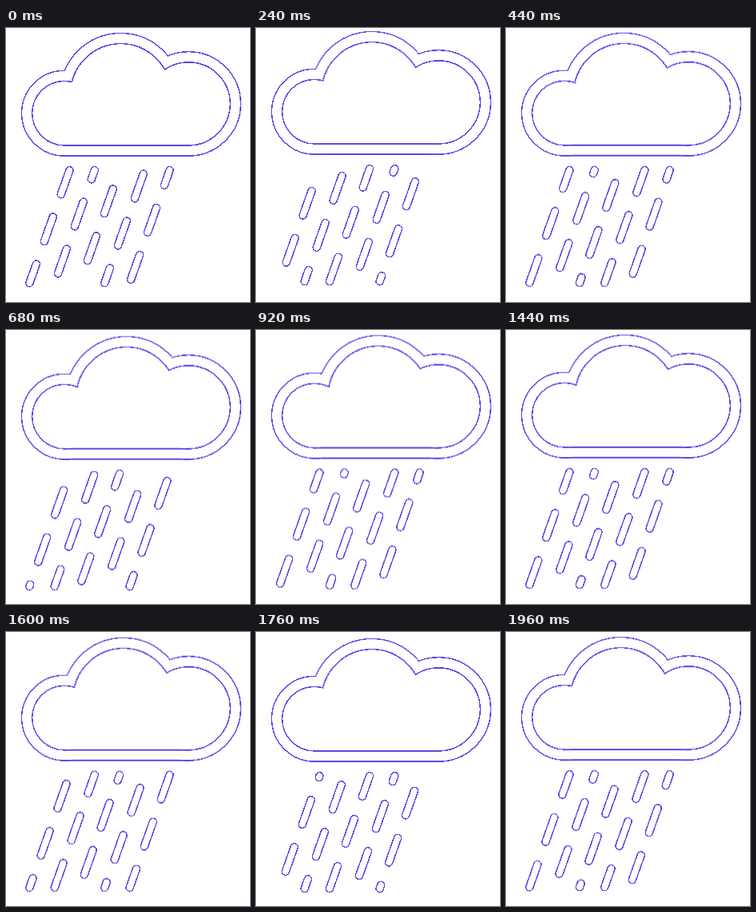
An HTML page for the animation above (2 s loop, 305 by 343 pixels).

```html
<!DOCTYPE html>
<html lang="en">
<head>
<meta charset="utf-8">
<title>Rain cloud</title>
<style>
  html, body { margin: 0; width: 100%; height: 100%; overflow: hidden; background: #fff; }
  svg { display: block; width: 305px; height: 343px; shape-rendering: crispEdges; }
  .ink { fill: #5b45e4; stroke: #5b45e4; }
  .paper { fill: #fff; stroke: #fff; }
  .cloud { stroke-linejoin: round; }
  .drops { stroke-linecap: round; stroke-dasharray: 30.6 28.4; }

  .scene { animation: bob 1s infinite cubic-bezier(.333, 0, .667, 1); }
  .puff { animation: sway 2s infinite cubic-bezier(.333, 0, .667, 1); }
  .drops path { animation: fall .5s linear infinite; }

  @keyframes bob {
    0%, 50%, 100% { transform: translateY(0); }
    25% { transform: translateY(-2px); }
    75% { transform: translateY(2px); }
  }
  @keyframes sway {
    0%, 100% { transform: translateX(0); }
    50% { transform: translateX(9.5px); }
  }
  @keyframes fall {
    from { stroke-dashoffset: var(--from); }
    to { stroke-dashoffset: calc(var(--from) - 59px); }
  }
</style>
</head>
<body>
<svg viewBox="0 0 305 343">
  <g class="scene" id="scene"></g>
</svg>
<script>
  const scene = document.getElementById('scene');

  const cloud = `
    <circle cx="73" cy="106.7" r="39.6"/>
    <circle cx="228.2" cy="94.9" r="51.4"/>
    <circle class="puff" cx="143.4" cy="82.3" r="62"/>
    <rect x="73" y="100" width="155.2" height="46.3"/>`;

  // Distance of the first dash from the top of each stream, in vertical units.
  const starts = [-0.7, -19.6, 23.2, 4.4, -12.2];
  const streams = starts.map((start, i) =>
    `<path pathLength="141" style="--from:${-start}px" d="M${79.4 + 31.3 * i} 178.2l-50 141"/>`
  ).join('');

  // Alternating ink and paper layers, widest first, leave only thin outlines.
  const layer = (kind, i, width, shapes) =>
    `<g class="${kind} ${i % 2 ? 'paper' : 'ink'}" stroke-width="${width}">${shapes}</g>`;

  scene.innerHTML =
    [29, 26.2, 2.8, 0].map((w, i) => layer('cloud', i, w, cloud)).join('') +
    [10.6, 7.7].map((w, i) => layer('drops', i, w, streams)).join('');
</script>
</body>
</html>
```
